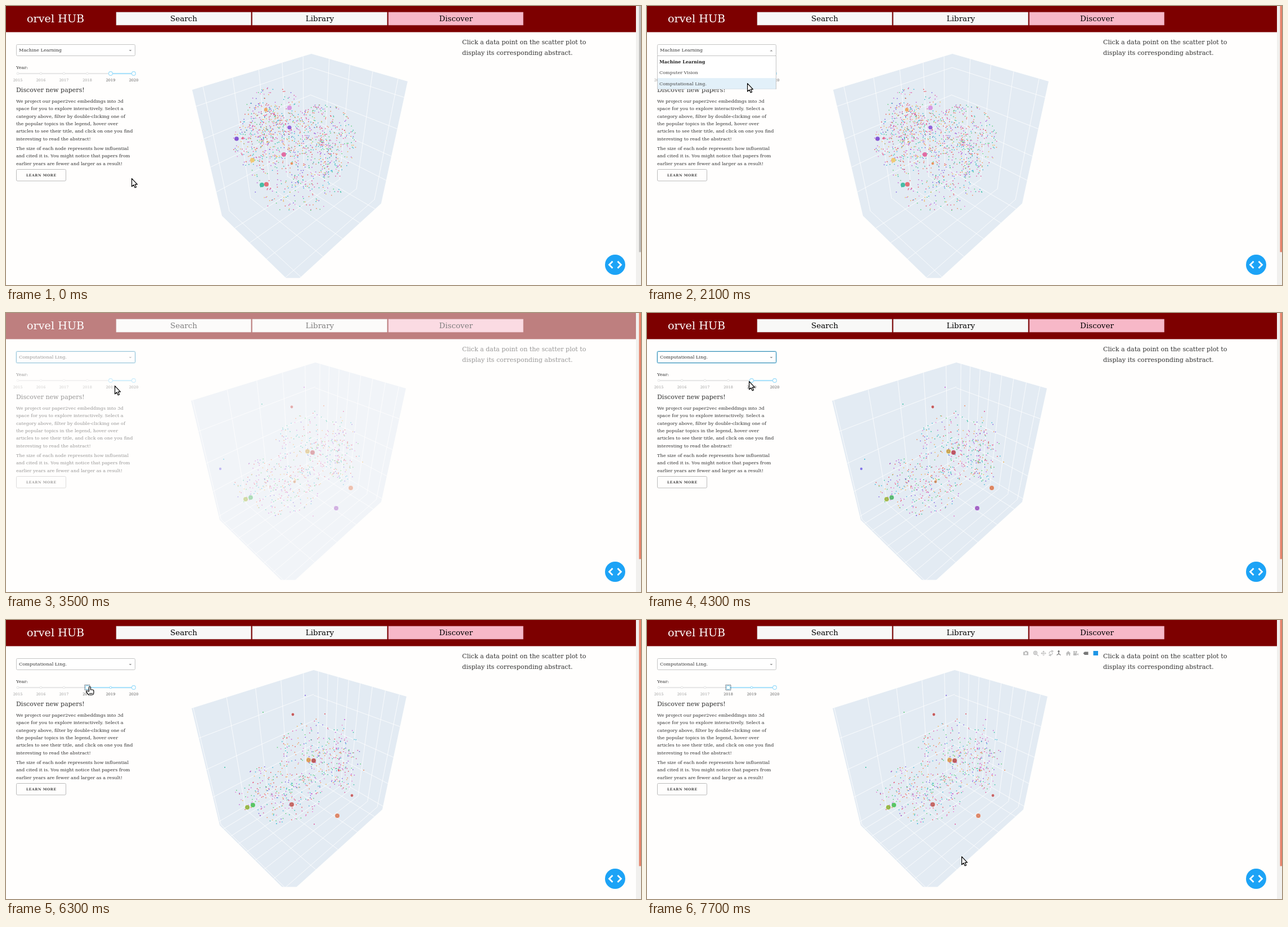
These frames come from a looping animation (1129 by 496 pixels, 8000 ms). An HTML page:

```html
<!DOCTYPE html>
<html lang="en">
<head>
<meta charset="utf-8">
<title>Discover papers</title>
<style>
  html, body { margin: 0; width: 100%; height: 100%; overflow: hidden; background: #fffefd; }
  svg { display: block; width: 100vw; height: 100vh; font-family: "DejaVu Serif", serif; }
  text { white-space: pre; }
  .tip text { font-family: "Liberation Sans", Arial, sans-serif; font-size: 7.06px; }
</style>
</head>
<body>
<svg viewBox="0 0 1129 496">
  <g id="page">
    <g id="fixed"></g>
    <g id="plots"></g>
    <g id="controls"></g>
  </g>
  <path fill="#f1f0ee" d="M1120 0h9v496h-9z"/>
  <path id="thumb" d="M1125.5 0h3.5v437.5h-3.5z"/>
  <circle cx="1083" cy="460" r="18" fill="#1ca3f6"/>
  <path d="M1078.5 454l-6 6 6 6M1087.5 454l6 6-6 6" fill="none" stroke="#fff" stroke-width="2.8"/>
  <g id="overlay"></g>
</svg>
<script>
const $ = id => document.getElementById(id);
const text = (x, y, size, str, attrs = 'fill="#333"') =>
  `<text x="${x}" y="${y}" font-size="${size}" ${attrs}>${str}</text>`;
const rect = (x, y, w, h, attrs) => `<rect x="${x}" y="${y}" width="${w}" height="${h}" ${attrs}/>`;
const circle = (x, y, r, attrs) => `<circle cx="${x}" cy="${y}" r="${r}" ${attrs}/>`;
const path = (d, attrs) => `<path d="${d}" ${attrs}/>`;
const poly = pts => 'M' + pts.map(p => p.map(n => n.toFixed(1))).join('L');

// ---- fixed page parts
const tabs = ['Search', 'Library', 'Discover'].map((name, i) => {
  const x = 196 + 242 * i, pink = i == 2;
  return rect(x, 11, 239.6, 23, `fill="${pink ? '#f7b8c8' : '#f8f8f7'}" stroke="${pink ? '#d08c9c' : '#c9bcbc'}" stroke-width=".6"`) +
    text(x + 120, 26.5, 13.5, name, 'fill="#000" text-anchor="middle"');
}).join('');
const intro = [
  'We project our paper2vec embeddings into 3d', 'space for you to explore interactively. Select a',
  'category above, filter by double-clicking one of', 'the popular topics in the legend, hover over',
  'articles to see their title, and click on one you find', 'interesting to read the abstract!'];
const note = [
  'The size of each node represents how influential', 'and cited it is. You might notice that papers from',
  'earlier years are fewer and larger as a result!'];
const para = (lines, y) => lines.map((s, i) => text(18, y + 13.3 * i, 8.14, s)).join('');
$('fixed').innerHTML =
  rect(0, 0, 1120, 46.5, 'fill="#7d0000"') + text(37, 29, 19.2, 'orvel HUB', 'fill="#fff"') + tabs +
  text(18, 112, 8.2, 'Year:') + text(18, 153, 11.05, 'Discover new papers!') +
  para(intro, 172) + para(note, 256) +
  rect(18.5, 290.5, 88, 20.5, 'rx="2" fill="none" stroke="#bbb"') +
  text(36, 303.2, 6.1, 'LEARN MORE', 'fill="#444" font-weight="bold" letter-spacing=".55"') +
  text(811, 68, 11.05, 'Click a data point on the scatter plot to') +
  text(811, 86.5, 11.15, 'display its corresponding abstract.');

// ---- perspective cube: weighted mixes of its corners
const mix = (...terms) => {
  let x = 0, y = 0, m = 0;
  for (const [w, p] of terms) { x += w * p[0]; y += w * p[1]; m += w; }
  return [x / m, y / m];
};
function quad(o, a, b, c) {
  const [ax, ay, bx, by, ox, oy] = [a, b, o].flatMap(p => [p[0] - c[0], p[1] - c[1]]);
  const d = ax * by - bx * ay, p = (ox * by - bx * oy) / d, q = (ax * oy - ox * ay) / d;
  const at = (s, t) => mix([1 - s - t, o], [s * p, a], [t * q, b]);
  return Object.assign(at, { p, q });
}
function cube(o, top, l, r, front, lt, rt) {
  return { o, top, l, r, front, lt, rt,
    left: quad(o, l, top, lt), right: quad(o, r, top, rt), floor: quad(o, l, r, front) };
}
const ticks = (start, step) => {
  const out = [];
  for (let s = start; s < 1; s += step) out.push(s);
  return out;
};
const across = (f, s) => poly([f(s, 0), f(s, 1)]);
const along = (f, t) => poly([f(0, t), f(1, t)]);

function random(seed) {
  return () => {
    seed = seed + 0x6D2B79F5 | 0;
    let t = Math.imul(seed ^ seed >>> 15, 1 | seed);
    t = t + Math.imul(t ^ t >>> 7, 61 | t) ^ t;
    return ((t ^ t >>> 14) >>> 0) / 4294967296;
  };
}
const palette = ['#e0559b', '#c65cd6', '#7d5ce0', '#3fb8d8', '#35c0a5', '#5ccf7a',
  '#f2b457', '#f08a5d', '#e8505b', '#e87fd0'];

// lobes: [share, cx, cy, rx, ry, spread]
function cloud(seed, count, lobes, dx, dy, shift) {
  const rnd = random(seed), d = palette.map(() => '');
  for (let i = 0; i < count; i++) {
    let pick = rnd();
    const [, cx, cy, rx, ry, spread] = lobes.find(l => (pick -= l[0]) < 0) || lobes[0];
    const a = rnd() * 2 * Math.PI, r = rnd() ** spread;
    const x = cx + rx * r * Math.cos(a) + dx, y = cy + ry * r * Math.sin(a) + dy;
    d[(Math.floor(rnd() * 10) + shift * i) % 10] += `M${x.toFixed(1)} ${y.toFixed(1)}h1.5`;
  }
  return d.map((s, i) => path(s, `stroke="${palette[i]}" stroke-width="1.5"`)).join('');
}

const cubes = [
  cube([541, 280], [543, 85], [384, 373], [667, 351], [509.6, 495], [331, 149], [714, 134]),
  cube([550, 265], [550, 88], [380, 368], [667, 336], [501, 486.7], [329, 156], [711, 134]),
  cube([548, 265], [547, 89], [380, 365], [669, 337], [503, 486.8], [330, 157], [712, 136])];
const wide = [[.16, 475, 192, 52, 48, .7], [.27, 455, 240, 54, 56, .7],
  [.37, 561, 240, 62, 66, .68], [.2, 518, 312, 86, 56, .7]];
const twin = [[.42, 482, 306, 78, 52, .72], [.42, 553, 235, 78, 62, .75], [.16, 590, 266, 32, 48, .75]];
const outliers = [[530, 132], [455, 162], [565, 165], [600, 175], [387, 260], [634, 265], [546, 361], [479, 360]];
const nodes = [
  [[462, 184, 3, '#f2a65a'], [504, 181, 4, '#d78fe0'], [504, 216, 3.5, '#8a55d8'], [410, 236, 3.8, '#7a45d0'],
   [421, 235, 2.3, '#e86a90'], [494, 264, 4, '#e0609b'], [438, 274, 4, '#f0c869'], [455, 318, 4, '#35b89c'],
   [463, 317, 4, '#e2636b'], [508, 280, 2.3, '#e88a4f']],
  [[508, 167, 2.4, '#e0504f'], [536, 246, 4, '#d9b04a'], [545, 248, 4, '#c84a5a'], [613, 311, 4, '#ee8355'],
   [587, 347, 4, '#a85cd0'], [426, 331, 4, '#a9c23f'], [435, 328, 4, '#4cc46c'], [381, 277, 2.2, '#7a6ae8'],
   [513, 300, 2.4, '#e8915a']],
  [[510, 168, 2.4, '#e0504f'], [538, 249, 4, '#eda24f'], [547, 250, 4, '#c85050'], [615, 312, 2.4, '#e35b5b'],
   [589, 348, 4, '#f08760'], [429, 333, 4, '#9bc23a'], [439, 329, 4, '#4cd058'], [508, 328, 4, '#d2605a']]];

function plot(i) {
  const c = cubes[i], bottom = i ? 474.5 : 483.5;
  const [us, vs, ws] = i ? [ticks(.11, .22), ticks(.065, .125), ticks(.04, .25)]
                         : [ticks(.09, .21), ticks(.22, .233), ticks(.24, .22)];
  const grid = us.map(u => across(c.left, u) + across(c.floor, u)).join('') +
    vs.map(v => across(c.right, v) + along(c.floor, v)).join('') +
    ws.map(w => along(c.left, w) + along(c.right, w)).join('');
  const dots = i
    ? cloud(29, 600, twin, i == 2 ? 2.5 : 0, i == 2 ? 1.5 : 0, i - 1) +
      outliers.map(([x, y], k) => circle(x + 2 * i - 2, y + 2 * i - 2, 1, `fill="${palette[(k * 3 + i) % 10]}"`)).join('')
    : cloud(7, 1250, wide, 0, 0, 0);
  const big = nodes[i].map(([x, y, r, color]) => circle(x, y, r, `fill="${color}" opacity=".9"`) +
    (i && r > 2.2 ? circle(x, y, r * .55, 'fill="none" stroke="#555" stroke-width=".6" opacity=".55"') : '')).join('');
  return `<g id="plot${i}"><clipPath id="clip${i}">${rect(300, 50, 450, bottom - 50, '')}</clipPath>` +
    `<g clip-path="url(#clip${i})">` +
    path(poly([c.top, c.rt, c.r, c.front, c.l, c.lt]) + 'z', 'fill="#e3ebf3"') +
    path(grid, 'fill="none" stroke="#fff" stroke-width=".9" opacity=".85"') + '</g>' + dots + big + '</g>';
}
$('plots').innerHTML = [0, 1, 2].map(plot).join('');

// ---- hover label with its guide lines
function hover(u, v, w, box, color, lines, label) {
  const c = cubes[2], { left, right, floor } = c, [x, y, width] = box;
  const point = mix([1 - u - v - w, c.o], [u * floor.p, c.l], [v * floor.q, c.r], [w * .8, c.top]);
  const guides = across(left, u) + across(floor, u) + across(right, v) + along(floor, v) +
    along(left, w) + along(right, w) +
    [left(u, w), right(v, w), floor(u, v)].map(p => poly([p, point])).join('');
  return path(guides, 'fill="none" stroke="#444" stroke-width=".9"') + '<g class="tip">' +
    rect(x, y, width, 42, `fill="${color}" stroke="#555"`) +
    lines.map((s, i) => text(x + 2.5, y + 9.7 + 9.2 * i, 7.06, s, 'fill="#444"')).join('') +
    text(x + width + 3, y + 9.7, 7, label, `fill="${color}"`) + '</g>';
}
const hoverA = hover(.365, .81, .713, [365.5, 208.5, 383.5], '#f0528f',
  ['x: −4.059228', 'y: 6.753796', 'z: 3.407381',
   '[1900.04417] ORVINE: A Graduated Assessment Procedure for Numerical Deduction in Everyday Language Statements'],
  'Benchmark (c...');
const hoverB = hover(.42, .72, .5, [269.5, 262.5, 372], '#4cc4ac',
  ['x: −3.284615', 'y: 4.918027', 'z: 1.150942',
   '[1900.02863] A Layered Approach to Sentence Structure Prediction with Small Annotated Text Collections'],
  'Parsing (co...');

const modebar = '<g fill="#bcbcbc">' +
  path('M669 56.5h2.500l1-1.500h3l1 1.500h1.500v6h-9zM671.500 59.300a2 2 0 1 0 4 0 2 2 0 1 0-4 0', 'fill-rule="evenodd"') +
  path('M693.5 61.5l2.5 2.5M688.5 58.5h4M690.5 56.5v4', 'stroke="#bcbcbc" stroke-width="1.2"') +
  circle(690.5, 58.5, 3, 'fill="none" stroke="#bcbcbc" stroke-width="1.3"') +
  path('M705 54.5l2 2.5h-4zM705 64l2-2.5h-4zM700.2 59.2l2.5-2v4zM709.8 59.2l-2.5-2v4zM704.5 56h1v7h-1zM702 58.7h6v1h-6z', '') +
  path('M715 60q0-4.5 5-4.5M721 58q0 4.5-5 4.5M719 53.8l3 1.7-3 1.8M718 60.5l-3 2 3 1.5', 'fill="none" stroke="#bcbcbc" stroke-width="1.2"') +
  path('M732 55v5l-3.5 2.5M732 60l3.5 2.5M730.5 56.5l1.5-2 1.5 2', 'fill="none" stroke="#777" stroke-width="1.3"') +
  path('M744.5 59.5l4.5-4.5 4.5 4.5h-1.2v3.8h-2.3v-2.5h-2v2.5h-2.3v-3.8z', '') +
  path('M758 58.5h6v4.5h-6zM764.5 60.5l2.5-1.5v4l-2.5-1.5z', '') +
  circle(759.5, 56.7, 1.6, '') + circle(763.2, 56.7, 1.6, '') +
  path('M775.5 59.3l2.5-2.8h6.5v5.6h-6.5z', 'fill="#777"') +
  rect(793.5, 55, 8.5, 8, 'fill="#1e96e6"') + '</g>';

// ---- controls
const stops = [21, 62, 103, 144.5, 186, 227];
function slider(start, focused) {
  const from = stops[start];
  return rect(21, 119, 206, 2.2, 'fill="#e7e7e7"') + rect(from, 119, 227 - from, 2.2, 'fill="#abe2fb"') +
    stops.map((x, i) =>
      circle(x, 120, 1.9, `fill="#fff" stroke="${i < start ? '#e4e4e4' : '#96dbfa'}"`) +
      text(x, 134, 6.5, 2015 + i, `text-anchor="middle" fill="${i < start ? '#999' : '#555'}"`)).join('') +
    [from, 227].map(x => circle(x, 120, 3.4, 'fill="#fff" stroke="#96dbfa" stroke-width="1.1"')).join('') +
    (focused ? rect(140, 115.5, 9, 9, 'fill="none" stroke="#345" stroke-dasharray="1 .6"') : '');
}
const topics = ['Machine Learning', 'Computer Vision', 'Computational Ling.'];
function dropdown(value, open, focused, pointerY) {
  const glow = focused ? rect(18, 68, 212, 21, 'rx="2.5" fill="none" stroke="#bfe3f2" stroke-width="2"') : '';
  let out = glow + rect(18.5, 68.5, 211, 20, `rx="2" fill="#fff" stroke="${focused ? '#3a8fb5' : '#c4c4c4'}"`) +
    text(23, 81, 8.2, topics[value]) +
    path(open ? 'M218.5 80.5h5l-2.5-2.5z' : 'M218.5 78h5l-2.5 2.5z', 'fill="#999"');
  if (open) {
    const hot = pointerY > 128 ? 2 : pointerY > 108.5 ? 1 : 0;
    out += rect(18.5, 88.5, 211, 59, 'fill="#fff" stroke="#c4c4c4"') +
      rect(19, 89 + 19.6 * hot, 210, 19.5, 'fill="#e2f0f9"') +
      topics.map((s, i) => text(22, 101.6 + 19.6 * i, i ? 8.1 : 7.95, s,
        i ? 'fill="#444"' : 'fill="#222" font-weight="bold"')).join('');
  }
  return out;
}

// ---- pointer: time, x, y
const moves = [[0, 223, 306], [300, 223, 306], [400, 220, 301], [500, 220, 301], [600, 164, 148], [700, 164, 148],
  [800, 213, 78], [900, 213, 78], [1000, 222, 71], [1100, 198, 105], [1200, 198, 105], [1300, 222, 79],
  [1400, 222, 79], [1700, 200, 104], [2100, 178, 137], [2500, 178, 137], [2700, 181, 132], [3400, 183, 133],
  [3700, 213, 121], [3800, 213, 121], [4300, 181, 121], [4700, 182, 121], [5100, 149, 119], [6300, 149, 119],
  [6900, 540, 196], [7000, 542, 198], [7200, 548, 240], [7300, 548, 240], [7700, 559, 420], [8000, 559, 420]];
function pointerAt(t) {
  const i = moves.findIndex(m => m[0] > t), [t0, x0, y0] = moves[i - 1], [t1, x1, y1] = moves[i];
  const k = (t - t0) / (t1 - t0);
  return [x0 + (x1 - x0) * k, y0 + (y1 - y0) * k];
}
function pointer(t, x, y) {
  const hand = t >= 4800 && t <= 6300, busy = t >= 2600 && t < 3500;
  const shape = hand
    ? 'M-1.5 8V1a1.5 1.5 0 0 1 3 0v4h3q2.5 0 2.5 2.5v2q0 4.5-3 4.5h-5q-2 0-3-2.5l-2.5-3q0-2 2.5-1zM-1 11.5h6'
    : 'M.6 .6V15l3.4-3 2.3 5 2.3-1-2.3-4.9h4.200z';
  const turn = t / 100 * .8;
  return `<g transform="translate(${x} ${y})">` +
    path(shape, 'fill="#fff" stroke="#000" stroke-width="1.2" stroke-linejoin="round"') +
    (busy ? circle(6.5, 9.5, 5.5, 'fill="#fff" stroke="#111" stroke-width="1.2"') +
      circle(6.5 + 2.4 * Math.cos(turn), 9.5 + 2.4 * Math.sin(turn), .8, 'fill="#111"') +
      circle(6.5 - 2.4 * Math.cos(turn), 9.5 - 2.4 * Math.sin(turn), .8, 'fill="#111"') : '') + '</g>';
}

function opacity(t) {
  if (t == 2600 || t == 3600 || t == 5600) return .75;
  return t > 2600 && t < 3600 || t > 5600 && t < 6300 ? .5 : 1;
}

function draw(t) {
  const [x, y] = pointerAt(t), scene = t < 3500 ? 0 : t < 6300 ? 1 : 2;
  $('page').setAttribute('opacity', opacity(t));
  for (let i = 0; i < 3; i++) $('plot' + i).style.display = i == scene ? '' : 'none';
  $('thumb').setAttribute('fill', t < 1300 ? '#bdbcba' : '#e6846c');
  $('controls').innerHTML = slider(t < 5000 ? 4 : 3, t >= 5000) +
    dropdown(t < 2600 ? 0 : 2, t >= 1300 && t < 2600, t >= 2600 && t < 4800, y);
  $('overlay').innerHTML = (t >= 6600 ? modebar : '') +
    (t == 6900 || t == 7000 ? hoverA : t >= 7200 && t < 7500 ? hoverB : '') + pointer(t, x, y);
}

let shown = -1;
const begin = performance.now();
function tick() {
  const t = Math.floor(Math.max(0, performance.now() - begin) % 8000 / 100) * 100;
  if (t != shown) draw(shown = t);
  requestAnimationFrame(tick);
}
tick();
</script>
</body>
</html>
```
